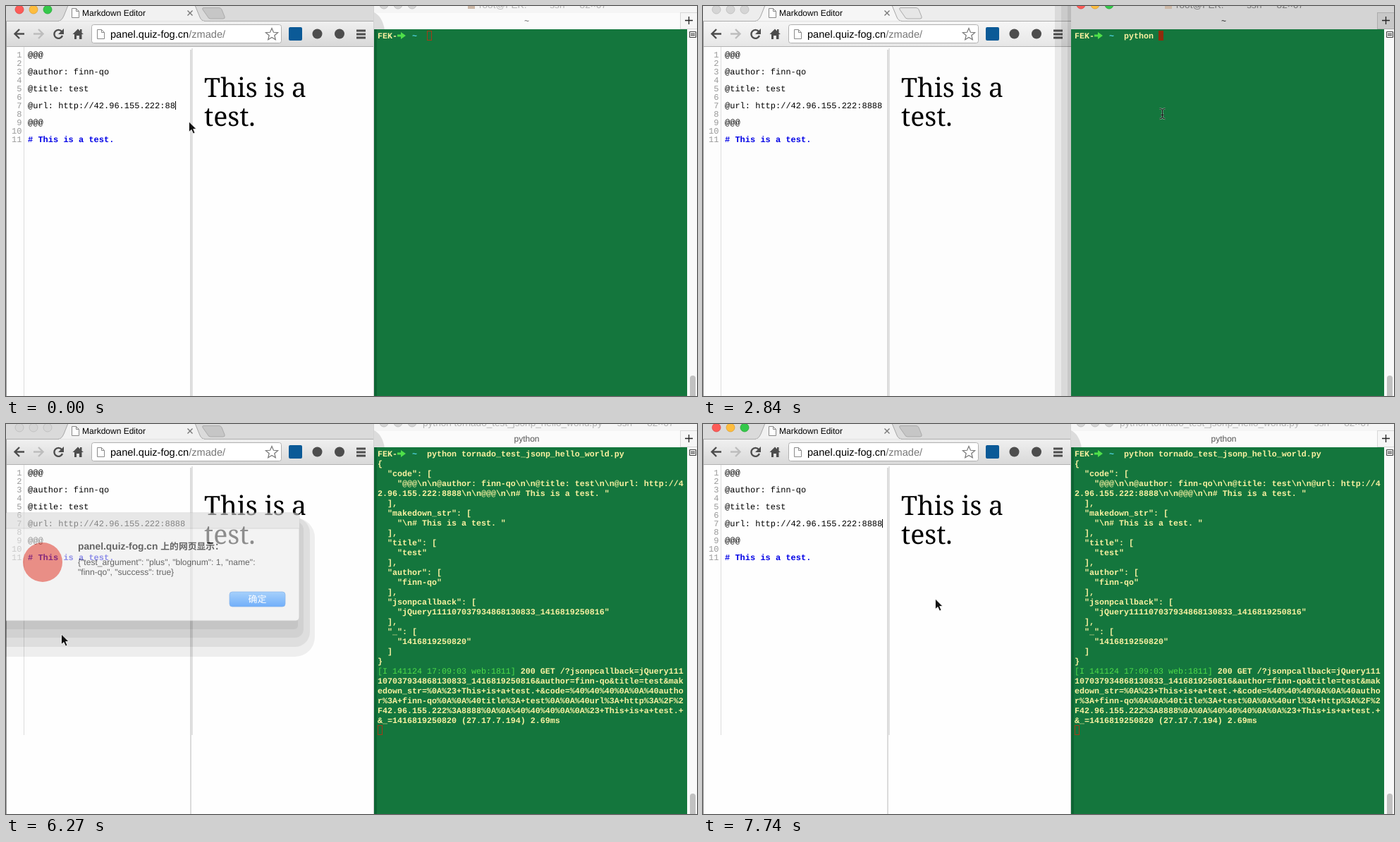
Animation of 980 by 553 pixels, one loop 8000 ms. Source, as an HTML page:

```html
<!DOCTYPE html>
<html lang="en">
<head>
<meta charset="utf-8">
<title>Markdown editor and terminal</title>
<style>
html, body { margin: 0; width: 100%; height: 100%; overflow: hidden; background: #fff; }
svg { display: block; width: 980px; height: 553px; text-rendering: geometricPrecision; }
text { white-space: pre; }
.ui { font-family: "Liberation Sans", sans-serif; }
.mono { font: 12px "Liberation Mono", monospace; }
.term { font: bold 11.667px "Liberation Mono", monospace; fill: #fbf2a2; }
.serif { font: 37.5px "Noto Serif", serif; }
.line { fill: none; stroke: #4d4d4d; stroke-width: 2.4; }

#browser { --title: #dadada; --top: #f0f0f0; --bottom: #d8d8d8; --tab: #f1f1f1; --add: #c6c6c6; --page: #fefefe; }
#browser.idle { --title: #ededed; --top: #f6f6f6; --bottom: #e6e6e6; --tab: #f6f6f6; --add: #e6e6e6; --page: #fdfdfd; }
#browser.plain { --title: #d8d8d8; --top: #fcfcfc; --bottom: #fcfcfc; --tab: #fcfcfc; --add: #fafafa; --page: #fcfcfc; }
.barTop { stop-color: var(--top); }
.barBottom { stop-color: var(--bottom); }
.title { fill: var(--title); }
.tab { fill: var(--tab); stroke: #a6a6a6; }
.add { fill: var(--add); stroke: #aaa; }
.page { fill: var(--page); }
#lights circle, #termLights circle { fill: #d5d5d5; stroke: #bcbcbc; stroke-width: .8; }
.lit .red { fill: #fc5b57 !important; stroke: #df4744 !important; }
.lit .yellow { fill: #fdbd3e !important; stroke: #dea033 !important; }
.lit .green { fill: #34c84a !important; stroke: #27aa35 !important; }

#terminal { --title: #f5f5f5; --tabs: #fbfbfb; --add: #f6f6f6; --ink: #b4b4b4; --edge: #d8d8d8; --name: #555; }
#terminal.focus { --title: #d4d4d4; --tabs: #d4d4d4; --add: #c8c8c8; --ink: #777; --edge: #acacac; --name: #111; }
.tabs { fill: var(--tabs); }
.plus { fill: var(--add); stroke: var(--edge); }
#cursor { fill: none; stroke: #a33a17; }
.focus #cursor { fill: #8f2b0c; stroke: #8f2b0c; }
.focus .cast { display: none; }
</style>
</head>
<body>
<svg viewBox="0 0 980 553">
  <defs>
    <linearGradient id="blue" x2="0" y2="1">
      <stop stop-color="#6db3fa"/><stop offset="1" stop-color="#147bf8"/>
    </linearGradient>
    <path id="sheet" d="M.5 .5h6l4 4v9h-10zM6.5 .5v4h4" fill="#fff" stroke="#8a8a8a"/>
    <path id="beamShape" d="M-3.500 -6.500Q.5 -6.500 .5 -4Q.5 -6.500 4.500 -6.500M.5 -5V6M-3.500 8Q.5 8 .5 5Q.5 8 4.500 8M-2 2.500H3" fill="none"/>
  </defs>

  <g id="browser">
    <linearGradient id="bar" x2="0" y2="1">
      <stop class="barTop"/><stop class="barBottom" offset="1"/>
    </linearGradient>
    <rect class="title" width="522" height="22"/>
    <path d="M0 21.500H522" stroke="#adadad"/>
    <rect y="22" width="522" height="36" fill="url(#bar)"/>
    <path class="tab" d="M74 21.500Q79 21 82 14L88 -1H268L275 16Q277 21 282 21.500"/>
    <path d="M75 22H281" stroke="#f2f2f2"/>
    <path class="add" d="M280 2.500H302Q305 2.500 306 5L310 15Q311 18 308 18H290Q287 18 286 15L279 5Q278 2.500 280 2.500Z"/>
    <g id="lights">
      <circle class="red" cx="19" cy="5" r="6"/><circle class="yellow" cx="39" cy="5" r="6"/><circle class="green" cx="59" cy="5" r="6"/>
    </g>
    <use href="#sheet" x="93" y="3"/>
    <text class="ui" x="108" y="14" font-size="12">Markdown Editor</text>
    <path d="M257.500 6.500l7 7m0-7l-7 7" stroke="#777" stroke-width="1.400"/>

    <path class="line" d="M26 39.500H13M19 33l-6.500 6.500L19 46"/>
    <path class="line" style="stroke:#bdbdbd" d="M39 39.500H52M46 33l6.500 6.500L46 46"/>
    <path class="line" d="M79 36A6 6 0 1 0 80 42"/><path d="M82 32v8h-8z" fill="#4d4d4d"/>
    <path d="M94.500 40L102 32.500 105 35.500V33h2.500v5L110 40H107.500V47H104V42H100V47H97V40Z" fill="#4d4d4d"/>
    <rect x="121.500" y="26.500" width="269" height="26" rx="3" fill="#fff" stroke="#b0b0b0"/>
    <use href="#sheet" x="129" y="33"/>
    <text class="ui" x="148" y="45" font-size="14.600">panel.quiz-fog.cn<tspan fill="#777">/zmade/</tspan></text>
    <path id="star" fill="#fff" stroke="#777" stroke-width="1.200"/>
    <rect x="401" y="30" width="19" height="19" rx="2" fill="#0b5a97"/>
    <circle cx="441.500" cy="39.500" r="7" fill="#4d4d4d"/>
    <circle cx="473" cy="39.500" r="7" fill="#4d4d4d"/>
    <path d="M497 35h13m-13 5h13m-13 5h13" stroke="#4d4d4d" stroke-width="3"/>
    <path d="M0 57.500H522" stroke="#b2b2b2"/>

    <rect class="page" y="58" width="522" height="495"/>
    <path id="gutter" stroke="#ddd"/>
    <path d="M262 62V553" stroke="#cfcfcf" stroke-width="1.500"/>
    <path id="split" stroke="#e2e2e2" stroke-width="2"/>
    <path d="M.5 22V553" stroke="#999"/>
    <g id="numbers" class="mono" fill="#999" text-anchor="end"></g>
    <g id="source" class="mono"></g>
    <path id="caret" stroke="#000"/>
    <text class="serif" x="281" y="129">This is a</text>
    <text class="serif" x="281" y="169.500">test.</text>
    <g id="cast">
      <rect x="499" width="23" height="553" fill="#000" opacity=".08"/>
      <rect x="508" width="14" height="553" fill="#000" opacity=".07"/>
      <rect x="517" width="5" height="553" fill="#000" opacity=".08"/>
    </g>
  </g>

  <g id="terminal">
    <rect class="title" x="522" width="458" height="10"/>
    <rect class="tabs" x="522" y="10" width="458" height="23"/>
    <path class="cast" d="M522 9Q533 14 537 33H522Z" fill="#dcdcdc"/>
    <rect class="plus" x="956.500" y="9.500" width="24" height="23"/>
    <path d="M963 20.500h11m-5.500-5.500v11" stroke="#222" stroke-width="1.300"/>
    <g id="termLights">
      <circle class="red" cx="536" cy="-2" r="6"/><circle class="yellow" cx="556" cy="-2" r="6"/><circle class="green" cx="576" cy="-2" r="6"/>
    </g>
    <rect id="house" x="655" y="-6" width="10" height="10" fill="#cdb8a6"/>
    <text id="windowTitle" class="ui" y="3" font-size="13.600" style="fill:var(--ink)"></text>
    <text id="tabTitle" class="ui" x="738.500" y="25" font-size="12" text-anchor="middle" style="fill:var(--name)"></text>
    <rect x="522" y="33" width="445" height="520" fill="#14763d"/>
    <rect class="cast" x="522" y="33" width="4" height="520" fill="#0d6533"/>
    <path class="cast" d="M521.500 0V553" stroke="#d2d2d2"/>
    <rect x="966" y="33" width="14" height="520" fill="#f9f9f9"/>
    <path d="M969.500 36.500h9v8h-9zM971 39.500h6m-6 2h6" fill="#e4e4e4" stroke="#444"/>
    <rect x="970" y="524" width="8" height="40" rx="4" fill="#c1c1c1"/>
    <g class="term">
      <text x="527" y="46">FEK-</text>
      <path d="M555 40.500h5v-3.500l7 5-7 5v-3.500h-5z" fill="#4fe04a"/>
      <text x="576" y="46" fill="#52d6e8">~</text>
      <text id="command" x="597" y="46"></text>
      <g id="output"></g>
    </g>
    <rect id="cursor" width="6" height="13"/>
  </g>

  <g id="dialog">
    <g id="shadow"></g>
    <rect x="-20" y="126" width="436" height="153" rx="5" fill="#ececec" stroke="#a9a9a9" stroke-width=".8"/>
    <path d="M0 126.500H411Q416 126.500 416 131V148H0Z" fill="#d9d9d9"/>
    <path d="M0 148H416" stroke="#bdbdbd"/>
    <circle cx="52" cy="196" r="28" fill="#dc4437"/>
    <text class="ui" x="102" y="178" font-size="13.800" font-weight="bold">panel.quiz-fog.cn <tspan font-size="12.800" font-family="Noto Sans CJK SC, Noto Sans CJK, sans-serif">上的网页显示：</tspan></text>
    <g class="ui" font-size="12.100">
      <text x="102" y="200">{"test_argument": "plus", "blognum": 1, "name":</text>
      <text x="102" y="214">"finn-qo", "success": true}</text>
    </g>
    <rect x="317" y="238" width="79" height="21" rx="4" fill="url(#blue)" stroke="#3d86dd" stroke-width=".7"/>
    <text x="356.500" y="253" font-size="13" fill="#fff" text-anchor="middle" font-family="Noto Sans CJK SC, Noto Sans CJK, sans-serif">确定</text>
  </g>

  <path id="arrow" d="M.5 0V14.500L4 11.500 6.500 17 9 16 6.700 10.500H11Z" fill="#111" stroke="#fff" stroke-width=".8"/>
  <g id="beam">
    <use href="#beamShape" stroke="#b9cfc2" stroke-width="2.400" opacity=".6"/>
    <use href="#beamShape" stroke="#111"/>
  </g>
</svg>
<script>
const $ = id => document.getElementById(id);
const LOOP = 8000, COLS = 62, CELL = 7, ROW = 14;
const SCRIPT = "tornado_test_jsonp_hello_world.py";

function addText(parent, x, y, content, attrs = {}) {
  const node = document.createElementNS("http://www.w3.org/2000/svg", "text");
  for (const [key, value] of Object.entries({ x, y, ...attrs })) node.setAttribute(key, value);
  node.textContent = content;
  parent.append(node);
  return node;
}
const show = (id, on) => { $(id).style.display = on ? "" : "none"; };
const at = (steps, t) => steps.findLast(step => step[0] <= t);
const within = (t, from, to) => t >= from && t < to;

// Editor
const author = "finn-qo", heading = "# This is a test.";
const source = ["@@@", "", `@author: ${author}`, "", "@title: test", "", "@url: http://42.96.155.222:8888", "", "@@@", "", heading];
const lines = source.map((content, i) => {
  const y = 73 + 12 * i;
  addText($("numbers"), 22.5, y, i + 1);
  return addText($("source"), 31, y, content, content === heading ? { fill: "#0000e6", "font-weight": "bold" } : {});
});
const urlLine = lines[6];
$("star").setAttribute("d", "M" + Array.from({ length: 10 }, (_, i) => {
  const r = i % 2 ? 4 : 9, a = (i / 5 - .5) * Math.PI;
  return [377 + r * Math.cos(a), 40.5 + r * Math.sin(a)].map(v => v.toFixed(1));
}).join("L") + "Z");

// Server output
const stamp = 1416819250816;
const request = {
  code: source.join("\n") + " ",
  makedown_str: `\n${heading} `,
  title: "test",
  author,
  jsonpcallback: `jQuery111107037934868130833_${stamp}`,
  _: String(stamp + 4)
};
const lists = Object.fromEntries(Object.entries(request).map(([key, value]) => [key, [value]]));
const printed = JSON.stringify(lists, null, 2);
const query = ["jsonpcallback", "author", "title", "makedown_str", "code", "_"]
  .map(key => `${key}=${encodeURIComponent(request[key]).replace(/%20/g, "+")}`).join("&");
const stampText = "[I 141124 17:09:03 web:1811]";
const log = `${stampText} 200 GET /?${query} (27.17.7.194) 2.69ms`;
const rows = [...printed.split("\n"), log].flatMap(row => row.match(new RegExp(`.{1,${COLS}}`, "g")));
rows.forEach((row, i) => {
  const y = 60 + ROW * i;
  if (row.startsWith(stampText)) {
    addText($("output"), 527, y, stampText, { fill: "#4fdc4a", "font-weight": "normal" });
    row = " ".repeat(stampText.length) + row.slice(stampText.length);
  }
  addText($("output"), 527, y, row);
});

// Shadow layers as [drop, spread]
const castShadow = layers => layers.map(([drop, spread]) =>
  `<rect x="-60" y="${126 + drop - spread}" width="${476 + spread}" height="${153 + 2 * spread}" rx="${Math.max(5, spread + 6)}" opacity=".11"/>`).join("");
const nearShadow = castShadow([[14, -2], [18, 6], [22, 15], [29, 22]]);
const farShadow = castShadow([[14, 0], [18, 10], [21, 24], [22, 38]]);

const pointer = [
  [0, 259, 164], [290, 345, 160], [440, 530, 152], [590, 651, 152],
  [4480, 560, 172], [4630, 380, 222], [4780, 210, 272], [4930, 78, 298],
  [6560, 95, 296], [6710, 165, 280], [6850, 255, 261], [7000, 325, 250], [7140, 345, 248], [7740, 329, 248]
];
const typing = [
  [0, ""], [1640, "p"], [1940, "py"], [2090, "pyt"], [2240, "pyth"], [2540, "pytho"], [2690, "python"],
  [2840, "python "], [3140, "python t"], [3290, `python ${SCRIPT} `]
];

function render(t) {
  const inTerminal = within(t, 740, 5080);
  const running = t >= 3740, answered = t >= 6270;
  const dialog = within(t, 6270, 7590);

  $("browser").setAttribute("class", inTerminal ? "idle" : within(t, 5080, 5230) ? "plain" : "");
  $("lights").setAttribute("class", inTerminal || dialog ? "" : "lit");
  $("terminal").setAttribute("class", inTerminal ? "focus" : "");
  $("termLights").setAttribute("class", inTerminal ? "lit" : "");
  show("cast", inTerminal);

  const paneEnd = answered ? 441 : 553;
  $("gutter").setAttribute("d", `M25.5 58V${paneEnd}`);
  $("split").setAttribute("d", `M264 60V${paneEnd}`);
  show("gutter", t < 5080 || answered);
  show("split", t < 5080 || answered);

  const missing = t < 140 ? 2 : t < 290 ? 1 : 0;
  urlLine.textContent = source[6].slice(0, source[6].length - missing);
  $("caret").setAttribute("d", `M${[254.5, 247.5, 240.5][missing]} 135v12`);
  show("caret", t < 740 || within(t, 5230, 5680) || t >= 7440);

  const command = at(typing, t)[1];
  $("command").textContent = command;
  $("windowTitle").textContent = (running ? `python ${SCRIPT}` : "root@FEK: ~") + " — ssh — 82×67";
  $("windowTitle").setAttribute("x", running ? 591 : 671);
  $("tabTitle").textContent = running ? "python" : "~";
  show("house", !running);
  show("output", answered);
  const [col, row] = answered ? [0, rows.length + 1] : running ? [0, 1] : [10 + command.length, 0];
  $("cursor").setAttribute("x", 527.5 + CELL * col);
  $("cursor").setAttribute("y", 35.5 + ROW * row);

  show("dialog", dialog);
  $("dialog").setAttribute("opacity", t < 6420 ? .6 : t < 7440 ? 1 : .4);
  const shadow = t < 6560 ? nearShadow : farShadow;
  if (render.shadow !== shadow) $("shadow").innerHTML = render.shadow = shadow;

  const [, x, y] = at(pointer, t);
  const overTerminal = x > 525;
  show("beam", overTerminal);
  show("arrow", !overTerminal);
  $(overTerminal ? "beam" : "arrow").setAttribute("transform", `translate(${x} ${y})`);
}

const start = performance.now();
function tick() {
  render((performance.now() - start) % LOOP);
  requestAnimationFrame(tick);
}
tick();
</script>
</body>
</html>
```
